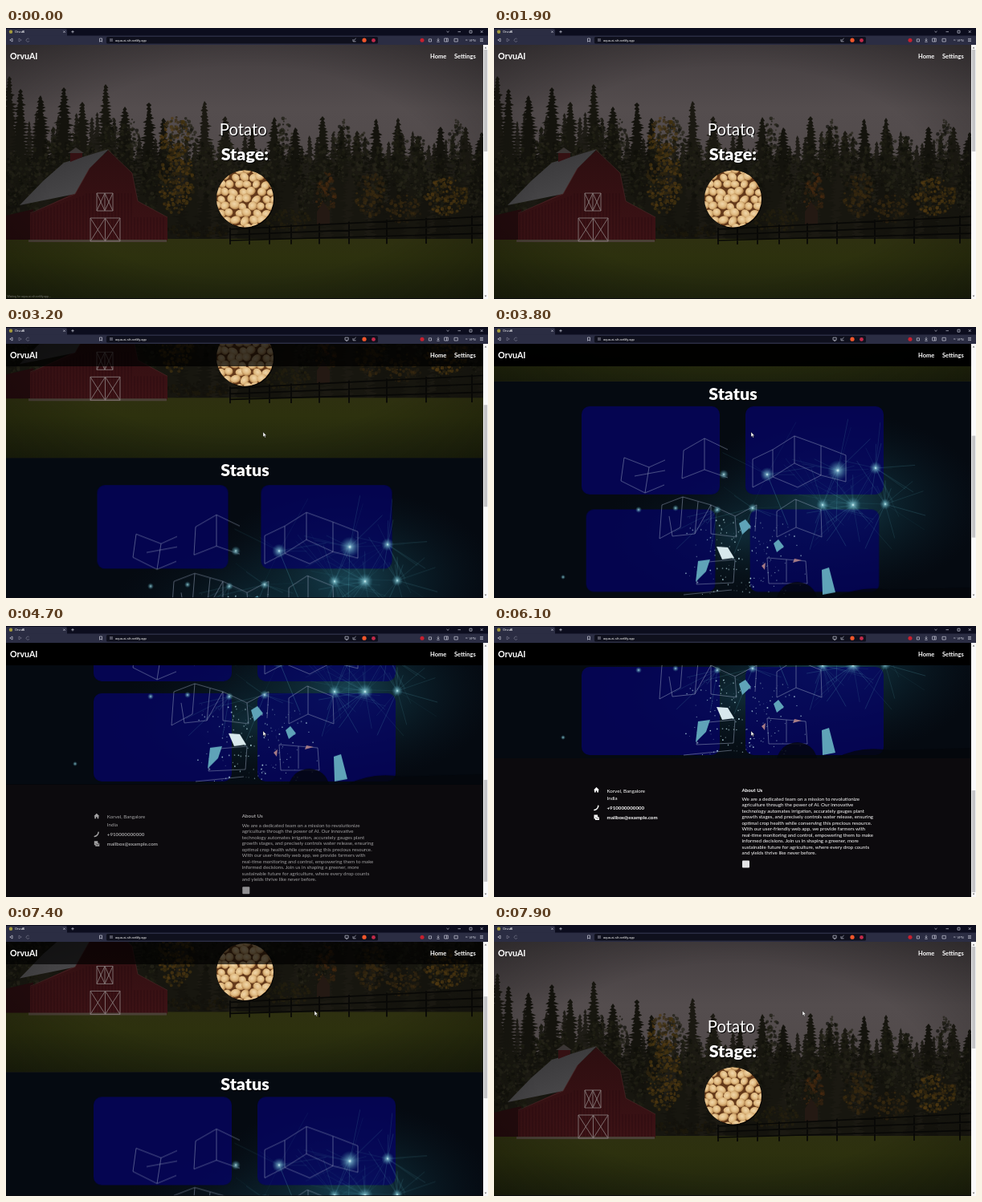
An HTML page for the animation above (8 s loop, 600 px wide and 338 px high).

```html
<!DOCTYPE html>
<html lang="en">
<head>
<meta charset="utf-8">
<title>Farm dashboard</title>
<style>
@property --s { syntax: "<number>"; inherits: true; initial-value: 0; }
html, body { margin: 0; width: 100%; height: 100%; overflow: hidden; background: #000; }
svg { display: block; width: 600px; height: 338px; font-family: Lato, sans-serif; fill: #fff;
  animation: scroll 8s linear infinite; }
#page { transform: translateY(calc(var(--s) * -1px)); }
#thumb { transform: translateY(calc(var(--s) * .402px)); }
#nav { fill: #000; fill-opacity: min(var(--s) / 160, .3 + var(--s) / 400, 1); }
.card { fill: #060564; fill-opacity: .78; transform-box: fill-box; transform-origin: center; }
.row1 { animation: row1 8s infinite; }
.row2 { animation: row2 8s infinite; }
#about { animation: slide 8s infinite; }
#cursor { animation: point 8s linear infinite; }
#wait { animation: wait 8s step-end infinite; }
#install { animation: install 8s step-end infinite; }
#ins { animation: ins 8s step-end infinite; }
.b { font-weight: 700; }
.h { font-weight: 900; font-size: 21.4px; }
.mid { text-anchor: middle; }
.shade { filter: drop-shadow(1px 1.2px .6px #000); }
.ui { font-family: "Liberation Sans", Arial, sans-serif; font-size: 4px; }
.line { fill: none; stroke: #c9cad8; stroke-width: .7; }

@keyframes scroll {
  0%, 30% { --s: 0; }
  33.75% { --s: 83; }
  38.75% { --s: 155; }
  43.75% { --s: 233; }
  47.5% { --s: 270; }
  52.5% { --s: 335; }
  58.75% { --s: 410; }
  61.9%, 82.5% { --s: 443; }
  87.5% { --s: 311; }
  92.5% { --s: 155; }
  97.5%, 100% { --s: 0; }
}
@keyframes row1 {
  0%, 33.5% { transform: scale(.6); opacity: .75; }
  44.75%, 100% { transform: none; opacity: 1; }
}
@keyframes row2 {
  0%, 41.5% { transform: scale(.6); opacity: .75; }
  52.75%, 100% { transform: none; opacity: 1; }
}
@keyframes slide {
  0%, 54.25% { transform: translateX(-39px); opacity: 0; }
  66.75%, 100% { transform: none; opacity: 1; }
}
@keyframes point {
  0%, 12% { transform: translate(320px, 131px); opacity: 0; }
  12.1%, 78% { transform: translate(320px, 131px); opacity: 1; }
  88%, 100% { transform: translate(384px, 107px); opacity: 1; }
}
@keyframes wait { 0% { opacity: 1; } 7.5%, 100% { opacity: 0; } }
@keyframes install { 0% { opacity: 0; } 31%, 100% { opacity: 1; } }
@keyframes ins { 0% { opacity: 0; } 32%, 39%, 100% { opacity: 0; } 33% { opacity: 1; } }
</style>
</head>
<body>
<svg viewBox="0 0 600 338">
  <defs>
    <linearGradient id="sky" x2="0" y2="1">
      <stop offset="0" stop-color="#443e40"/><stop offset=".25" stop-color="#544d4e"/><stop offset="1" stop-color="#4b4443"/>
    </linearGradient>
    <linearGradient id="grass" x2="0" y2="1">
      <stop offset="0" stop-color="#2e3010"/><stop offset=".3" stop-color="#2d310e"/><stop offset="1" stop-color="#20250d"/>
    </linearGradient>
    <linearGradient id="wall" x2="0" y2="1">
      <stop offset="0" stop-color="#2d0e10"/><stop offset="1" stop-color="#3c1215"/>
    </linearGradient>
    <linearGradient id="roof" x2=".6" y2="1">
      <stop offset="0" stop-color="#333234"/><stop offset="1" stop-color="#4a494b"/>
    </linearGradient>
    <radialGradient id="vig" r=".75">
      <stop offset=".55" stop-opacity="0"/><stop offset="1" stop-opacity=".38"/>
    </radialGradient>
    <radialGradient id="haze">
      <stop offset="0" stop-color="#1d5264" stop-opacity=".8"/><stop offset=".45" stop-color="#10323f" stop-opacity=".5"/><stop offset="1" stop-color="#0a1c2a" stop-opacity="0"/>
    </radialGradient>
    <radialGradient id="glow">
      <stop offset="0" stop-color="#e8feff"/><stop offset=".2" stop-color="#8fd4e0" stop-opacity=".65"/><stop offset="1" stop-color="#3d8ba0" stop-opacity="0"/>
    </radialGradient>
    <radialGradient id="spud" cx=".45" cy=".4" r=".62">
      <stop offset="0" stop-color="#f1d7aa"/><stop offset=".6" stop-color="#dfb980"/><stop offset="1" stop-color="#a87640"/>
    </radialGradient>
    <clipPath id="view"><rect y="21" width="594" height="317"/></clipPath>
    <clipPath id="dish"><circle cx="297.5" cy="213" r="35.5"/></clipPath>
    <clipPath id="hall"><rect y="338" width="594" height="270"/></clipPath>
  </defs>

  <g clip-path="url(#view)">
    <g id="page">
      <rect y="21" width="594" height="317" fill="url(#sky)"/>
      <g id="trees"></g>
      <rect y="263" width="594" height="75" fill="url(#grass)"/>
      <g id="barn">
        <path d="M0 234L34 226V264H0z" fill="#230b0d"/>
        <path d="M127 153L157 181L164 216L201 236V265H30V232L84 206L103 175z" fill="url(#wall)"/>
        <path d="M72 168L128 151L104 175L86 207L17 221L46 191z" fill="url(#roof)"/>
        <path d="M80 167V156H95V161z" fill="#351113"/>
        <path d="M77 156L87 149L97 156z" fill="#3a3534"/>
        <path id="boards" stroke="#220a0c" stroke-width=".4"/>
        <path d="M28 264H200V267H28z" fill="#4a4036"/>
        <path d="M127 152L157 181L164 216L201 236M104 175L86 207L30 231" fill="none" stroke="#4a2626" stroke-width=".7"/>
        <path d="M113 206H133V228H113zM123 206V228M113 206L123 228M123 206L113 228M123 206L133 228M133 206L123 228M105 237H142V266H105zM123.5 237V266M105 237L123.5 266M123.5 237L105 266M123.5 237L142 266M142 237L123.5 266" fill="none" stroke="#857878" stroke-width=".9"/>
      </g>
      <path d="M387 229L395 217L403 229V245H387z" fill="#241913"/>
      <path id="fence" fill="none" stroke="#080806" stroke-width="1.7"/>
      <rect y="21" width="594" height="317" fill="url(#vig)"/>
      <g class="shade mid">
        <text x="295.3" y="133.5" font-size="20.3">Potato</text>
        <text x="297.3" y="164.5" class="h">Stage:</text>
        <circle cx="297.5" cy="213" r="35.5" fill="#64391a"/>
      </g>
      <g id="spuds" clip-path="url(#dish)"></g>

      <g clip-path="url(#hall)">
        <rect y="338" width="594" height="270" fill="#050a11"/>
        <ellipse cx="425" cy="490" rx="185" ry="115" fill="url(#haze)"/>
        <ellipse cx="300" cy="530" rx="170" ry="90" fill="url(#haze)" opacity=".5"/>
        <rect class="card row1" x="109" y="369" width="172" height="110" rx="10"/>
        <rect class="card row1" x="313" y="369" width="172" height="110" rx="10"/>
        <rect class="card row2" x="109" y="494" width="172" height="110" rx="10"/>
        <rect class="card row2" x="313" y="494" width="172" height="110" rx="10"/>
        <g id="lights" transform="translate(0 270)">
          <g id="beams" stroke="#5fb0bf" stroke-width=".9"></g>
          <path fill="none" stroke="#a3b0c8" stroke-width=".8" stroke-opacity=".6" d="M162 163L158 192L188 207L193 175zM193 175L213 166M188 207L212 197M175 186L213 179M236 154L262 139L291 153M262 139V178L234 189L236 154M262 178L291 188M322 165L347 153L374 136L407 148L438 160V193L407 185L374 170V136M322 165V200L347 187V153M347 187L374 170M407 148V185L378 200L347 187M209 222L235 212L270 222L300 236L327 222M209 222L206 264L232 250L235 212M254 218L250 258M218 236L222 261L250 258L270 222V258L302 262L300 236M327 222L325 255M352 230L375 215L407 228L408 262L376 250V215M352 230V262L376 250M252 321L256 294L300 290L298 319zM340 288L388 292L390 320L342 320zM364 290V318M236 334L296 328"/>
          <g id="spots" fill="url(#glow)"></g>
          <g id="bits" fill="#b7dde6"></g>
          <path fill="#d8e8ec" d="M277 274L291 275L299 288L284 290z"/>
          <path fill="#5fa3b8" d="M305 245L313 240L320 249L309 259zM348 270L354 265L361 274L352 281zM254 292L269 290L264 305L251 318zM408 303L417 300L425 331L409 334z"/>
          <path fill="#a87d86" d="M333 298L338 294L337 303zM374 289L383 291L372 294z"/>
          <path fill="#04070c" fill-opacity=".8" d="M352 338Q358 319 378 318Q398 320 402 338zM425 338Q455 322 492 328L594 325V338z"/>
        </g>
        <text x="297.5" y="361" class="h mid shade">Status</text>
      </g>

      <rect y="608" width="594" height="175" fill="#0c0a0d"/>
      <g id="about" font-size="6.2">
        <path d="M124 647.5L127.5 644L131 647.5H130V650.5H128.3V648.5H126.7V650.5H125V647.5z"/>
        <path d="M125 672.6Q129.5 671.5 129.8 667.3" fill="none" stroke="#fff" stroke-width="1.5" stroke-linecap="round"/>
        <path d="M124.5 678.5H129V681H131V685H126V683.5H124.5z"/>
        <path d="M126.2 681.5L128.5 683.2L131 681.3" fill="none" stroke="#0c0a0d" stroke-width=".6"/>
        <text x="140.5" y="650.5">Korvel, Bangalore</text>
        <text x="140.5" y="660">India</text>
        <g class="b">
          <text x="140.5" y="672.2">+910000000000</text>
          <text x="140.5" y="684">mailbox@example.com</text>
          <text x="308.5" y="649.5">About Us</text>
        </g>
        <g id="para"></g>
        <rect x="309" y="735.5" width="9" height="9" rx="1" fill="#e4e4e6"/>
      </g>
    </g>

    <rect id="nav" y="21" width="594" height="28"/>
    <text x="5" y="39" class="b" font-size="10.6">OrvuAI</text>
    <g class="b" font-size="7.5">
      <text x="528" y="38">Home</text>
      <text x="558" y="38">Settings</text>
    </g>
    <text id="wait" x="1.5" y="335.5" font-family="Liberation Sans, sans-serif" font-size="3.5" fill="#77766f">Waiting for aqua-ai-sih.netlify.app...</text>
    <rect y="337.2" width="594" height=".8" fill="#0b0b12"/>
  </g>

  <rect x="594" y="21" width="6" height="317" fill="#fafafa"/>
  <path d="M595.6 25.4L597 23.4L598.4 25.4zM595.6 333.6L597 335.6L598.4 333.6z" fill="#777"/>
  <rect id="thumb" x="594.8" y="27" width="4.4" height="127" fill="#c4c4c6"/>

  <g class="ui">
    <rect width="600" height="10" fill="#0c0d1e"/>
    <path d="M0 10V2Q0 1 2 1H74Q76 1 76 3V10z" fill="#2b2d43"/>
    <rect y="9.5" width="600" height="11.5" fill="#2b2d43"/>
    <rect x="125" y="11" width="338" height="8.4" rx="1.5" fill="#0f101d"/>
    <circle cx="6" cy="4.7" r="2.2" fill="#a39a3c"/>
    <text x="11" y="6.2">OrvuAI</text>
    <text x="136" y="16.6">aqua-ai-sih.netlify.app</text>
    <text x="576.5" y="16.6" fill="#d5d6e2">VPN</text>
    <path class="line" d="M71.3 3.5L73.7 5.9M73.7 3.5L71.3 5.9M81.3 4.7H84.7M83 3V6.4M8 13L4.8 15L8 17zM116.5 13H119.5V17.2L118 16L116.5 17.2zM129 14H133M129 16H133M548.5 4L550 5.4L551.5 4M562.5 4.7H566M577 3.2H580V6.2H577zM590.8 3.2L593.6 6M593.6 3.2L590.8 6M432 16.8H435.5M432 16.8V14M433 15.5L435.6 13M526.3 13.8H529.5V17H526.3zM538 12.7V16M536.6 14.7L538 16.1L539.4 14.7M536.3 17.2H539.7M545.7 13H550.3V17H545.7zM548.5 13V17M558 13.3H562.3V17H558zM572 15H574.5M590 13.4H594M590 15H594M590 16.6H594"/>
    <path class="line" stroke-opacity=".45" d="M16 13L19.2 15L16 17zM28.8 14A2 2 0 1 0 29 16"/>
    <path id="install" class="line" d="M422 13.2H426.2V16.3H422zM423 17.3H425.3"/>
    <g id="ins">
      <rect x="412" y="11.6" width="17" height="7" rx="3" fill="#25273a"/>
      <path class="line" d="M414.4 13.2H418.2V16.2H414.4zM415.3 17.2H417.4"/>
      <text x="420.5" y="16.6">Ins</text>
    </g>
    <circle cx="446" cy="15.2" r="2.6" fill="#f1562b"/>
    <circle cx="457.5" cy="15.4" r="2.4" fill="#c22a4a"/>
    <circle cx="518" cy="15.2" r="2.5" fill="#c8202f"/>
  </g>
  <path id="cursor" d="M0 0V6L1.4 4.8L2.4 7L3.3 6.6L2.4 4.5H4.2z" stroke="#111" stroke-width=".4"/>
</svg>

<script>
const $ = id => document.getElementById(id);
let seed = 7;
const rnd = (a = 0, b = 1) => {
  seed = (seed * 16807) % 2147483647;
  return a + (b - a) * seed / 2147483647;
};
const add = (parent, tag, attrs) => {
  const node = document.createElementNS("http://www.w3.org/2000/svg", tag);
  for (const k in attrs) node.setAttribute(k, attrs[k]);
  return parent.appendChild(node);
};
const pick = list => list[Math.floor(rnd(0, list.length))];

// Forest
const trees = $("trees");
function conifer(x, top, w, fill) {
  const base = 264, n = Math.round((base - top) / 4);
  const side = dir => {
    const pts = [];
    for (let i = 1; i <= n; i++) {
      const y = top + (base - top) * i / n, r = w * Math.min(1, .12 + 1.6 * i / n);
      pts.push([x + dir * r * rnd(.55, 1.25), y + rnd(-1, 1)], [x + dir * r * rnd(.25, .6), y + 1.5]);
    }
    return pts;
  };
  const pts = [[x, top], ...side(1), ...side(-1).reverse()];
  add(trees, "path", { d: "M" + pts.map(p => p.map(v => v.toFixed(1)).join(" ")).join("L") + "z", fill });
}
function leafy(x, y, rx, ry, colors) {
  for (let i = 0; i < rx * ry / 4; i++) {
    const a = rnd(0, 6.28), d = Math.sqrt(rnd());
    add(trees, "circle", { cx: x + rx * d * Math.cos(a), cy: y + ry * d * Math.sin(a), r: rnd(.7, 2.5), fill: pick(colors), opacity: .7 });
  }
}
const darks = ["#17160f", "#1b1912", "#14130d"];
add(trees, "rect", { y: 165, width: 594, height: 100, fill: "#16140e" });
for (let x = -4; x < 600; x += 10) conifer(x + rnd(-3, 3), (x < 160 ? 112 : 136) + rnd(-8, 14), 14, "#1e1c16");
[[4, 60], [18, 76], [43, 84], [72, 74], [95, 92], [124, 70], [148, 98], [178, 93], [196, 112], [247, 91], [273, 110], [306, 124],
 [334, 111], [360, 124], [394, 110], [418, 122], [437, 128], [461, 113], [488, 112], [513, 134], [541, 123], [572, 123], [592, 130]]
  .forEach(([x, top]) => conifer(x, top, rnd(17, 23), pick(darks)));
for (let x = 0; x < 600; x += 13) conifer(x + rnd(-4, 4), rnd(160, 205), 15, pick(darks));
for (let x = 10; x < 600; x += 24) leafy(x, rnd(150, 200), 12, 40, ["#26251a", "#201f14", "#100f0a", "#1a190f"]);
const gold = ["#45330f", "#523a11", "#382a0f", "#2a2210"];
const dim = ["#3b2b10", "#30240f", "#221c0f"];
leafy(210, 138, 18, 27, gold);
leafy(212, 190, 22, 42, gold);
leafy(398, 208, 12, 28, ["#46290f", "#38240f", "#2a1f10"]);
leafy(455, 208, 20, 27, dim);
leafy(548, 210, 27, 24, gold);
leafy(495, 226, 22, 18, dim);
leafy(350, 240, 30, 14, ["#1c1b0e", "#251f0e"]);
leafy(240, 252, 40, 9, ["#12110b", "#1d180c"]);

$("boards").setAttribute("d", Array.from({ length: 42 }, (_, i) => `M${32 + i * 4} ${i < 17 ? 233 - i * 1.5 : i < 32 ? 206 : 236}V264`).join(""));

// Fence, rising to the right
const railY = (x, k) => 251 - (x - 278) * .05 + k * (7 + (x - 278) * .011);
let rails = "";
for (let k = 0; k < 3; k++) rails += `M278 ${railY(278, k)}L594 ${railY(594, k)}`;
for (const x of [279, 303, 328, 355, 390, 427, 474, 523, 580]) rails += `M${x} ${railY(x, 0) - 2}V${270 - (x - 278) * .004}`;
$("fence").setAttribute("d", rails);

// Potatoes
for (let row = 0; row < 9; row++)
  for (let col = 0; col < 8; col++) {
    const x = 257 + col * 11 + (row % 2) * 5.5 + rnd(-2, 2), y = 177 + row * 9 + rnd(-1.6, 1.6);
    add($("spuds"), "ellipse", { cx: x, cy: y, rx: rnd(5, 6.6), ry: rnd(4.4, 5.6), fill: "url(#spud)",
      transform: `rotate(${rnd(-60, 60)} ${x} ${y})` });
  }

// Stage lights: x, y, radius, rays
[[340, 184, 9, 9], [428, 179, 13, 10], [475, 176, 8, 16], [409, 222, 8, 18], [447, 222, 10, 22], [487, 221, 7, 14],
 [322, 226, 6, 8], [278, 228, 5, 6], [180, 228, 4, 0], [226, 226, 4, 0], [286, 184, 6, 0], [86, 312, 3, 0]]
  .forEach(([cx, cy, r, rays]) => {
    add($("spots"), "circle", { cx, cy, r });
    for (let i = 0; i < rays; i++) {
      const a = rnd(0, 6.28), len = rnd(20, 75);
      add($("beams"), "path", { d: `M${cx} ${cy}l${len * Math.cos(a)} ${len * Math.sin(a)}`, opacity: rnd(.06, .24) });
    }
  });
for (let i = 0; i < 170; i++)
  add($("bits"), "circle", { cx: 312 + rnd(-45, 45) + rnd(-45, 45), cy: rnd(238, 334), r: rnd(.3, 1), opacity: rnd(.3, .95) });

`We are a dedicated team on a mission to revolutionize
agriculture through the power of AI. Our innovative
technology automates irrigation, accurately gauges plant
growth stages, and precisely controls water release, ensuring
optimal crop health while conserving this precious resource.
With our user-friendly web app, we provide farmers with
real-time monitoring and control, empowering them to make
informed decisions. Join us in shaping a greener, more
sustainable future for agriculture, where every drop counts
and yields thrive like never before.`.split("\n").forEach((line, i) => {
  add($("para"), "text", { x: 308.5, y: 660.7 + i * 7.5 }).textContent = line;
});
</script>
</body>
</html>
```
